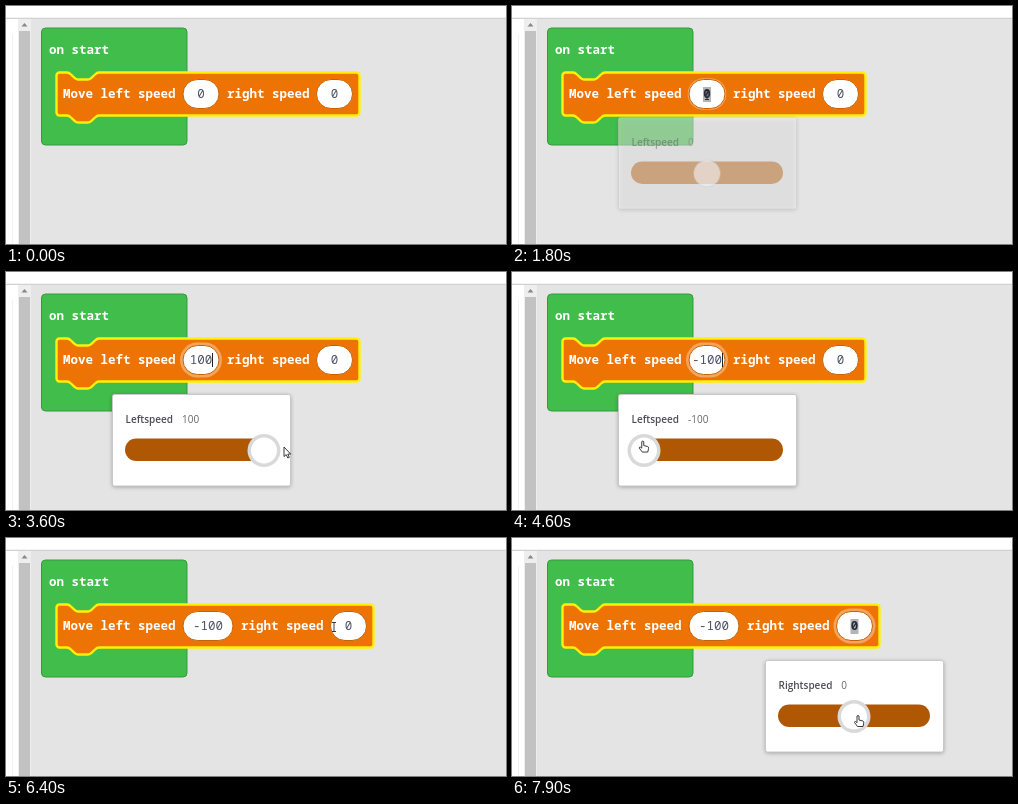
Animation, 500 px wide and 238 px high, one loop 8 s. Source, as an HTML page with a canvas:

```html
<!DOCTYPE html>
<html lang="en">
<head>
<meta charset="utf-8">
<title>Block editor speed sliders</title>
<style>
html, body { margin: 0; width: 100%; height: 100%; overflow: hidden; background: #e4e4e4; }
canvas { display: block; width: 500px; height: 238px; }
</style>
</head>
<body>
<canvas id="stage" width="500" height="238"></canvas>
<script>
const ctx = document.getElementById('stage').getContext('2d');
const LOOP = 8000;
const MONO = '"Noto Sans Mono", "DejaVu Sans Mono", monospace';
const SANS = '"Open Sans", "Noto Sans", sans-serif';
const CHAR = 7.5;
const PX_PER_UNIT = 0.63;

// Pointer path: time, x, y
const pointerPath = [
  [700, 222, 220], [1500, 195, 89], [1950, 195, 89], [2300, 202, 120],
  [2500, 202, 120], [2850, 196, 178], [2950, 196, 178], [3300, 259, 178],
  [3600, 278, 175], [3950, 278, 175], [4750, 116, 169], [5250, 116, 169],
  [5850, 316, 92], [6200, 316, 92], [6350, 328, 89], [7050, 328, 89],
  [7750, 346, 178], [8000, 346, 178]
];

const clamp = (v, lo, hi) => Math.min(hi, Math.max(lo, v));
const progress = (t, start, length) => clamp((t - start) / length, 0, 1);
const smooth = p => p * p * (3 - 2 * p);

function pointerAt(t) {
  for (let i = 1; i < pointerPath.length; i++) {
    const [t0, x0, y0] = pointerPath[i - 1], [t1, x1, y1] = pointerPath[i];
    if (t <= t1) {
      const p = smooth(progress(t, t0, t1 - t0));
      return { x: x0 + (x1 - x0) * p, y: y0 + (y1 - y0) * p };
    }
  }
}

function rounded(x, y, w, h, r, fill, stroke, line = 1) {
  ctx.beginPath();
  ctx.roundRect(x, y, w, h, r);
  paint(fill, stroke, line);
}

function circle(x, y, r, fill, stroke) {
  ctx.beginPath();
  ctx.arc(x, y, r, 0, 7);
  paint(fill, stroke, 1);
}

function paint(fill, stroke, line) {
  if (fill) { ctx.fillStyle = fill; ctx.fill(); }
  if (stroke) { ctx.strokeStyle = stroke; ctx.lineWidth = line; ctx.stroke(); }
}

function rect(x, y, w, h, fill) {
  ctx.fillStyle = fill;
  ctx.fillRect(x, y, w, h);
}

function text(str, x, y, font, color, align = 'left') {
  ctx.font = font;
  ctx.fillStyle = color;
  ctx.textAlign = align;
  ctx.fillText(str, x, y);
}

const label = (str, x, y) => text(str, x, y, `600 12.5px ${MONO}`, '#fff');

function drawWorkspace() {
  rect(0, 0, 500, 238, '#e4e4e4');
  rect(0, 0, 500, 12, '#fff');
  rect(0, 11, 500, 1, '#f3f3f3');
  rect(0, 12, 500, 1, '#d2d2d2');
  rect(0, 13, 12, 225, '#fff');
  rect(6, 28, 1, 210, '#f1f1f1');
  rect(12, 13, 13, 225, '#eeeeee');
  rect(13, 25, 11, 213, '#c2c2c2');
  ctx.beginPath();
  ctx.moveTo(15.5, 20.5);
  ctx.lineTo(18.5, 17);
  ctx.lineTo(21.5, 20.5);
  paint('#888');
}

function notch(x, y, dir) {
  const at = (dx, dy) => [x + dir * dx, y + dy];
  const curve = (...p) => ctx.bezierCurveTo(...at(p[0], p[1]), ...at(p[2], p[3]), ...at(p[4], p[5]));
  ctx.lineTo(...at(0, 0));
  curve(2, 0, 3, 1, 4, 2);
  ctx.lineTo(...at(7.5, 5.3));
  curve(8.5, 6.5, 9.5, 7, 11, 7);
  ctx.lineTo(...at(21, 7));
  curve(22.5, 7, 23.5, 6.5, 24.5, 5.3);
  ctx.lineTo(...at(28, 2));
  curve(29, 1, 30, 0, 32, 0);
}

function drawMoveBlock(right) {
  const l = 50.5, top = 66.5, bottom = 109.5, r = 3;
  ctx.beginPath();
  ctx.moveTo(l + r, top);
  notch(61, top, 1);
  ctx.arcTo(right, top, right, bottom, r);
  ctx.arcTo(right, bottom, l, bottom, r);
  notch(93, bottom, -1);
  ctx.arcTo(l, bottom, l, top, r);
  ctx.arcTo(l, top, right, top, r);
  ctx.closePath();
  ctx.lineJoin = 'round';
  paint('#ed7404', '#fff00a', 2.4);
}

function drawField({ x, width, value, focus, selected, caret }) {
  const cx = x + width / 2;
  if (focus > 0) {
    const g = 3 * focus;
    rounded(x - g, 73.5 - g, width + 2 * g, 29 + 2 * g, 14.5 + g, 'rgba(255,255,255,.35)');
  }
  rounded(x, 73.5, width, 29, 14.5, '#fff', '#c76203');
  if (selected) rect(cx - 4, 81, 8, 15, '#b4b4b4');
  text(value, cx, 92, `${selected ? 600 : 500} 12.5px ${MONO}`, selected ? '#252b38' : '#4b5163', 'center');
  if (caret) rect(Math.round(cx + value.length * CHAR / 2), 81, 1, 14, '#222');
}

function drawPopup({ x, name, value, alpha, offset, halo }) {
  if (alpha <= 0) return;
  ctx.save();
  ctx.globalAlpha = alpha;
  ctx.translate(x, 122 + offset);
  ctx.shadowColor = 'rgba(0,0,0,.32)';
  ctx.shadowBlur = 4;
  ctx.shadowOffsetY = 1;
  rounded(.5, .5, 178, 91.5, 2, '#fff');
  ctx.shadowColor = 'transparent';
  rounded(.5, .5, 178, 91.5, 2, null, '#c8c8c8');

  text(name, 13.5, 29, `600 10px ${SANS}`, '#4c4c55');
  const valueX = 13.5 + ctx.measureText(name).width + 9;
  text(value, valueX, 29, `10px ${SANS}`, '#666');

  rounded(13, 44.5, 152, 22.5, 11.25, '#b05704');
  const knob = 89 + value * PX_PER_UNIT;
  if (halo) circle(knob, 56.5, 16.5, '#d9d9d9');
  else circle(knob, 56.5, 14, 'rgba(205,205,205,.8)');
  circle(knob, 56.5, 13, '#fff');
  ctx.restore();
}

const shapes = {
  arrow: 'M0 0V9.5L2.2 7.6L3.8 11L5.3 10.3L3.8 7.1H6.7Z',
  hand: 'M-1 0Q0 -1 1 0V4L5 5Q6 5.3 5.8 7L5 10.5H-.5L-3.5 6.5Q-3.5 5.2 -2.3 5.6L-1 6.6Z',
  grab: 'M-2 -4.5Q-1 -6 0 -4.8Q1 -6.2 2 -4.6Q3.4 -5 3.5 -3.5Q4.7 -3.5 4.5 -2L4 2.5L3 5H-1L-4 1Q-4 -.5 -2.5 .3Z',
  ibeam: 'M-2 -4.5H2M0 -4.5V4.5M-2 4.5H2'
};
for (const key in shapes) shapes[key] = new Path2D(shapes[key]);

function drawPointer(kind, { x, y }) {
  ctx.save();
  ctx.translate(x, y);
  ctx.lineWidth = .9;
  ctx.strokeStyle = '#252525';
  ctx.fillStyle = '#fff';
  if (kind !== 'ibeam') ctx.fill(shapes[kind]);
  ctx.stroke(shapes[kind]);
  ctx.restore();
}

function pointerKind(t, { x, y }) {
  if (t < 1400) return 'arrow';
  if (t < 2050 || (t > 6250 && t < 7150)) return 'ibeam';
  if (t > 5750 && t <= 6250) return 'grab';
  const onTrack = y > 167 && y < 190 && ((x > 120 && x < 270) || x > 300);
  return onTrack ? 'hand' : 'arrow';
}

function draw(t) {
  const pointer = pointerAt(t);
  let left = 0;
  if (t > 2900) left = t < 4750 ? Math.round(clamp((pointer.x - 195) / PX_PER_UNIT, -100, 100)) : -100;

  const leftOpen = progress(t, 1690, 250);
  const leftClose = progress(t, 6200, 200);
  const rightOpen = progress(t, 6500, 250);
  const resized = t >= 6300;
  const shift = resized ? 14 : 0;

  drawWorkspace();
  rounded(35.5, 22, 145.5, 117, 4, '#40bd4a', '#359a3e');
  label('on start', 43, 48);
  drawMoveBlock(353.5 + shift);
  label('Move left speed', 57, 92);
  label('right speed', 221 + shift, 92);
  drawField({
    x: 177, width: resized ? 50 : 36, value: String(left),
    focus: resized ? 0 : leftOpen,
    selected: t >= 1600 && t <= 2900,
    caret: t > 2900 && t < 4800
  });
  drawField({
    x: 310.5 + shift, width: 36, value: '0',
    focus: rightOpen, selected: t >= 6450
  });

  drawPopup({
    x: 106, name: 'Leftspeed', value: left,
    alpha: leftOpen * (1 - leftClose),
    offset: -20 * (1 - leftOpen) - 20 * leftClose,
    halo: t > 2750
  });
  drawPopup({
    x: 253, name: 'Rightspeed', value: 0,
    alpha: rightOpen, offset: -20 * (1 - rightOpen), halo: t > 7550
  });

  if (t >= 700) drawPointer(pointerKind(t, pointer), pointer);
}

function tick() {
  draw(performance.now() % LOOP);
  requestAnimationFrame(tick);
}
tick();
</script>
</body>
</html>
```
